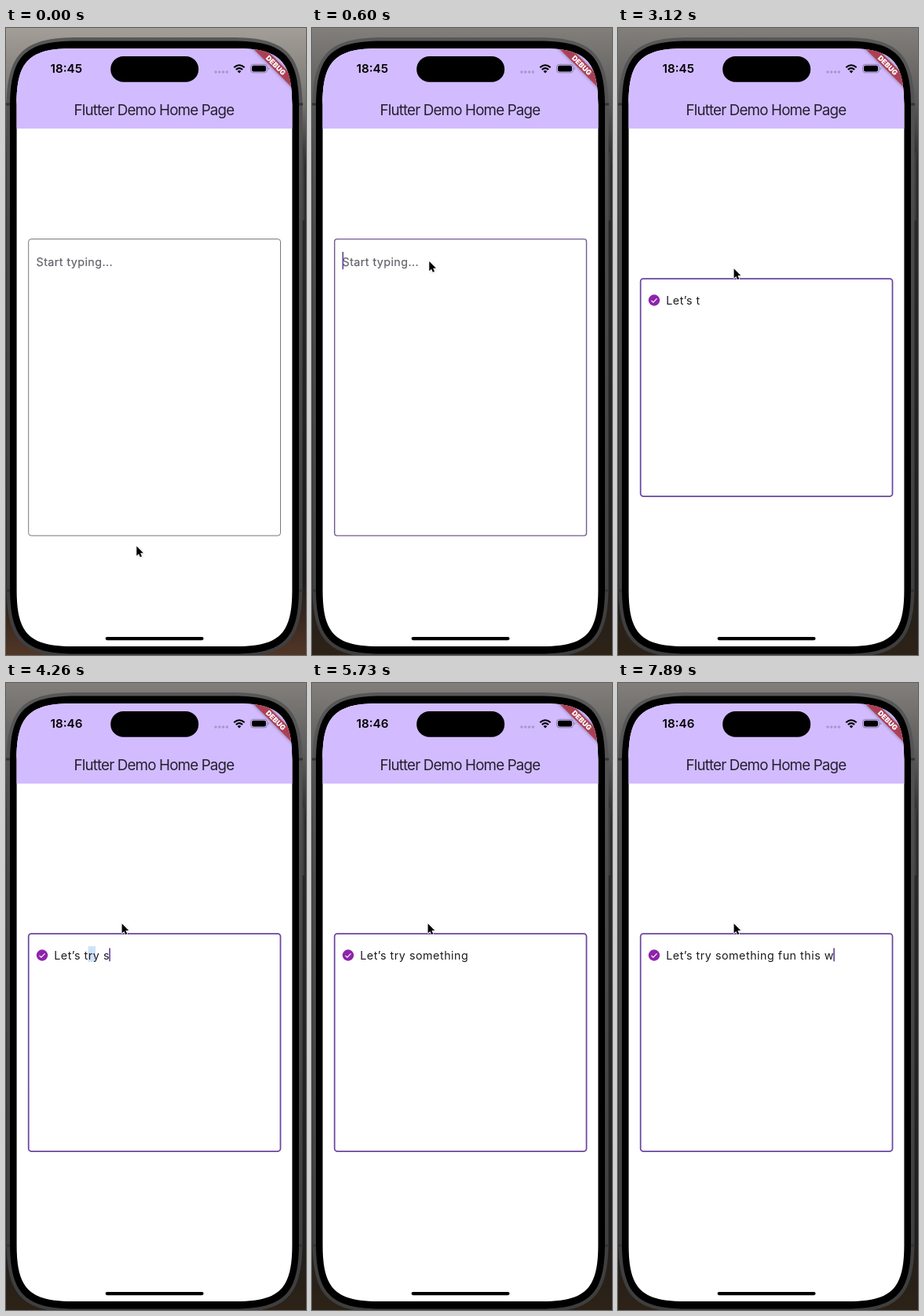
These frames come from a looping animation (382 px wide and 798 px high, 8 s). An HTML page:

```html
<!DOCTYPE html>
<html lang="en">
<head>
<meta charset="utf-8">
<title>Typing demo</title>
<style>
  html, body { margin: 0; width: 100%; height: 100%; overflow: hidden; background: #333; }
  svg { display: block; width: 100vw; height: 100vh; }
  text { font-family: Inter, Roboto, sans-serif; white-space: pre; }
  #hint, #typed { font-size: 14.3px; letter-spacing: .51px; }
  #hint { letter-spacing: .43px; }
</style>
</head>
<body>
<svg viewBox="0 0 382 798" xmlns="http://www.w3.org/2000/svg">
  <defs>
    <linearGradient id="wall" x1="0" y1="0" x2="0" y2="1">
      <stop offset="0" stop-color="#827f7b"/>
      <stop offset=".12" stop-color="#5a5958"/>
      <stop offset=".22" stop-color="#29292a"/>
      <stop offset=".88" stop-color="#1f1f1f"/>
      <stop offset="1" stop-color="#2d2216"/>
    </linearGradient>
    <linearGradient id="wallStart" x1="0" y1="0" x2="0" y2="1">
      <stop offset="0" stop-color="#a39e98"/>
      <stop offset=".12" stop-color="#77736f"/>
      <stop offset=".22" stop-color="#2b2a2c"/>
      <stop offset=".88" stop-color="#1d1a1a"/>
      <stop offset="1" stop-color="#523626"/>
    </linearGradient>
    <linearGradient id="rim" x1="0" y1="0" x2="0" y2="1">
      <stop offset="0" stop-color="#585858"/>
      <stop offset=".3" stop-color="#4a4a4b"/>
      <stop offset="1" stop-color="#3e3e3f"/>
    </linearGradient>
    <clipPath id="screen"><path id="glass"/></clipPath>
    <filter id="soft" x="-30%" y="-100%" width="160%" height="300%"><feGaussianBlur stdDeviation="2.2"/></filter>
  </defs>

  <rect width="382" height="798" fill="url(#wall)"/>
  <rect id="wallOld" width="382" height="798" fill="url(#wallStart)"/>
  <rect x="376" y="158" width="4" height="87" rx="1.5" fill="#3c3c3d"/>
  <path id="edge" fill="url(#rim)"/>
  <path d="M0 97h5M373 97h5M0 716h5M373 716h5" stroke="#333" stroke-width="3"/>
  <path id="bezel"/>

  <g clip-path="url(#screen)">
    <rect x="13" y="26" width="353" height="762" fill="#fff"/>
    <rect x="13" y="26" width="353" height="102" fill="#d2bcff"/>
    <text id="clock" x="56.6" y="57" font-size="15.2" font-weight="600">18:45</text>
    <rect x="133.2" y="36" width="112" height="32.8" rx="16.4"/>
    <path d="M267 56h15" stroke="#a898cc" stroke-width="3.6" stroke-linecap="round" stroke-dasharray="0 4.8"/>
    <path d="M290.3 50.3Q297 44.2 303.7 50.3M292.8 53Q297 49.3 301.2 53" fill="none" stroke="#000" stroke-width="2.1"/>
    <path d="M294.6 55Q297 53 299.4 55L297 57.6Z"/>
    <rect x="311.5" y="46.3" width="21" height="10.6" rx="3.4" fill="none" stroke="#8b7da9"/>
    <rect x="313" y="47.8" width="18" height="7.6" rx="2.2"/>
    <path d="M333.8 50v3.4q1.4-.5 1.4-1.7t-1.4-1.7" fill="#8b7da9"/>
    <text x="188.4" y="110.5" font-size="18.8" letter-spacing="-.85" text-anchor="middle" fill="#251f30">Flutter Demo Home Page</text>

    <g transform="translate(365 26) rotate(45)">
      <rect x="-40" y="25" width="80" height="10.7" opacity=".4" filter="url(#soft)"/>
      <rect x="-40" y="25" width="80" height="10.7" fill="#b13a4c" opacity=".9"/>
      <text y="33.6" font-size="9" font-weight="900" text-anchor="middle" fill="#fff">DEBUG</text>
    </g>

    <rect id="field" x="28.7" width="320.8" rx="3.4" fill="none"/>
    <text id="hint" x="38.6" y="302.5" fill="#65626a" stroke="#65626a" stroke-width=".2">Start typing...</text>
    <g id="note">
      <rect id="mark" y="335" width="9.5" height="20" fill="#cfe2fa"/>
      <circle cx="46" cy="346.5" r="7.2" fill="#8e24aa"/>
      <path d="M42.5 346.8l2.4 2.4 4.6-4.8" fill="none" stroke="#fff" stroke-width="1.1"/>
      <text id="typed" x="61.2" y="351.5" fill="#1d1b20"></text>
    </g>
    <rect id="caret" width="1.7" rx=".8" fill="#6a46a0"/>
    <rect x="126.6" y="775" width="125" height="4.2" rx="2.1"/>
  </g>

  <g id="mouse">
    <path d="M0 0V13.6L3.1 10.7L5.1 15.4L7.4 14.4L5.4 9.8H9.6Z" transform="translate(.5 1)" opacity=".2" filter="url(#soft)"/>
    <path d="M0 0V13.6L3.1 10.7L5.1 15.4L7.4 14.4L5.4 9.8H9.6Z" stroke="#fff" stroke-width="1.5" paint-order="stroke" stroke-linejoin="round"/>
  </g>
</svg>
<script>
const LOOP = 8000, FOCUS = 510, FADE = 110, TEXT_X = 61.2;

// Typing comes in bursts: text, start, time per character
const BURSTS = [
  ["Let", 1950, 170], ["’s ", 2670, 130], ["tr", 3120, 150], ["y s", 4050, 90],
  ["ome", 4410, 210], ["thing ", 5040, 105], ["fun ", 6450, 110],
  ["th", 6870, 100], ["is", 7200, 270], [" w", 7710, 90]
];
const NOTE = BURSTS.map(b => b[0]).join("");
const FIRST_KEY = BURSTS[0][1];

// The caret fades out at the first time and back in at the second
const GAPS = [[1030, 1330], [2860, 3120], [3790, 3940], [5620, 5950], [6580, 7780]];
// Highlight: start, end, x
const MARKS = [[4050, 4410, 104.5], [5040, 5400, 104.5], [7200, 7470, 208]];

const el = {};
document.querySelectorAll("svg [id]").forEach(n => el[n.id] = n);

const set = (node, attrs) => {
  for (const k in attrs) node.setAttribute(k, attrs[k]);
};
const clamp = v => Math.min(1, Math.max(0, v));
const mix = (a, b, p) => a + (b - a) * p;
const ramp = (t, from, length) => clamp((t - from) / length);
const ease = (t, from, length) => {
  const p = ramp(t, from, length);
  return p * p * (3 - 2 * p);
};

// Rectangle whose corners blend gradually into the sides
function squircle(x, y, w, h, r) {
  const e = 1.4 * r, k = .315 * r, s = e - k;
  return `M${x + e} ${y}h${w - 2 * e}c${s} 0 ${e} ${k} ${e} ${e}` +
    `v${h - 2 * e}c0 ${s} ${-k} ${e} ${-e} ${e}` +
    `h${2 * e - w}c${-s} 0 ${-e} ${-k} ${-e} ${-e}` +
    `v${2 * e - h}c0 ${-s} ${k} ${-e} ${e} ${-e}Z`;
}

function typedCount(t) {
  return BURSTS.reduce((sum, [text, start, step]) =>
    sum + Math.min(text.length, Math.max(0, Math.floor((t - start) / step) + 1)), 0);
}

function caretOpacity(t) {
  return GAPS.reduce((o, [out, back]) =>
    o * (1 - ramp(t, out, FADE) * (1 - ramp(t, back, FADE))), ramp(t, FOCUS, 60));
}

set(el.edge, { d: squircle(.5, 12, 377, 789, 65) });
set(el.bezel, { d: squircle(5, 16.5, 368, 780, 60) });
set(el.glass, { d: squircle(13.6, 26, 350.8, 761, 51) });
el.typed.textContent = NOTE;
const ends = [...NOTE].map((_, i) => el.typed.getSubStringLength(0, i + 1));

function draw(t) {
  const typing = t >= FIRST_KEY;
  const count = typedCount(t);
  const focus = ease(t, FOCUS, 170);
  const rgb = [[121, 106], [116, 70], [126, 160]].map(([a, b]) => Math.round(mix(a, b, focus)));

  set(el.wallOld, { opacity: 1 - ramp(t, 30, 500) });
  set(el.field, {
    y: typing ? 319 : 268.6,
    height: typing ? 277 : 377.5,
    stroke: `rgb(${rgb})`,
    "stroke-width": mix(1, 1.75, focus)
  });
  set(el.hint, { opacity: typing ? 0 : 1 });
  set(el.note, { opacity: typing ? 1 : 0 });
  el.typed.textContent = NOTE.slice(0, count);
  el.clock.textContent = t < 3780 ? "18:45" : "18:46";

  const mark = MARKS.find(([a, b]) => t >= a && t < b);
  set(el.mark, { x: mark ? mark[2] : 0, opacity: mark ? 1 : 0 });
  set(el.caret, {
    x: count ? TEXT_X + ends[count - 1] - .8 : 38.5,
    y: typing ? 337.3 : 284.8,
    height: typing ? 17.2 : 22.4,
    opacity: caretOpacity(t)
  });

  const reach = ease(t, 30, 450), settle = ease(t, 620, 150);
  const x = 166.3 - 17 * reach - 1.7 * settle;
  const y = 659.5 - 362.5 * reach + 9.3 * settle;
  set(el.mouse, { transform: `translate(${x} ${y}) scale(.9)` });
}

const start = performance.now();
function tick() {
  draw((performance.now() - start) % LOOP);
  requestAnimationFrame(tick);
}
tick();
</script>
</body>
</html>
```
